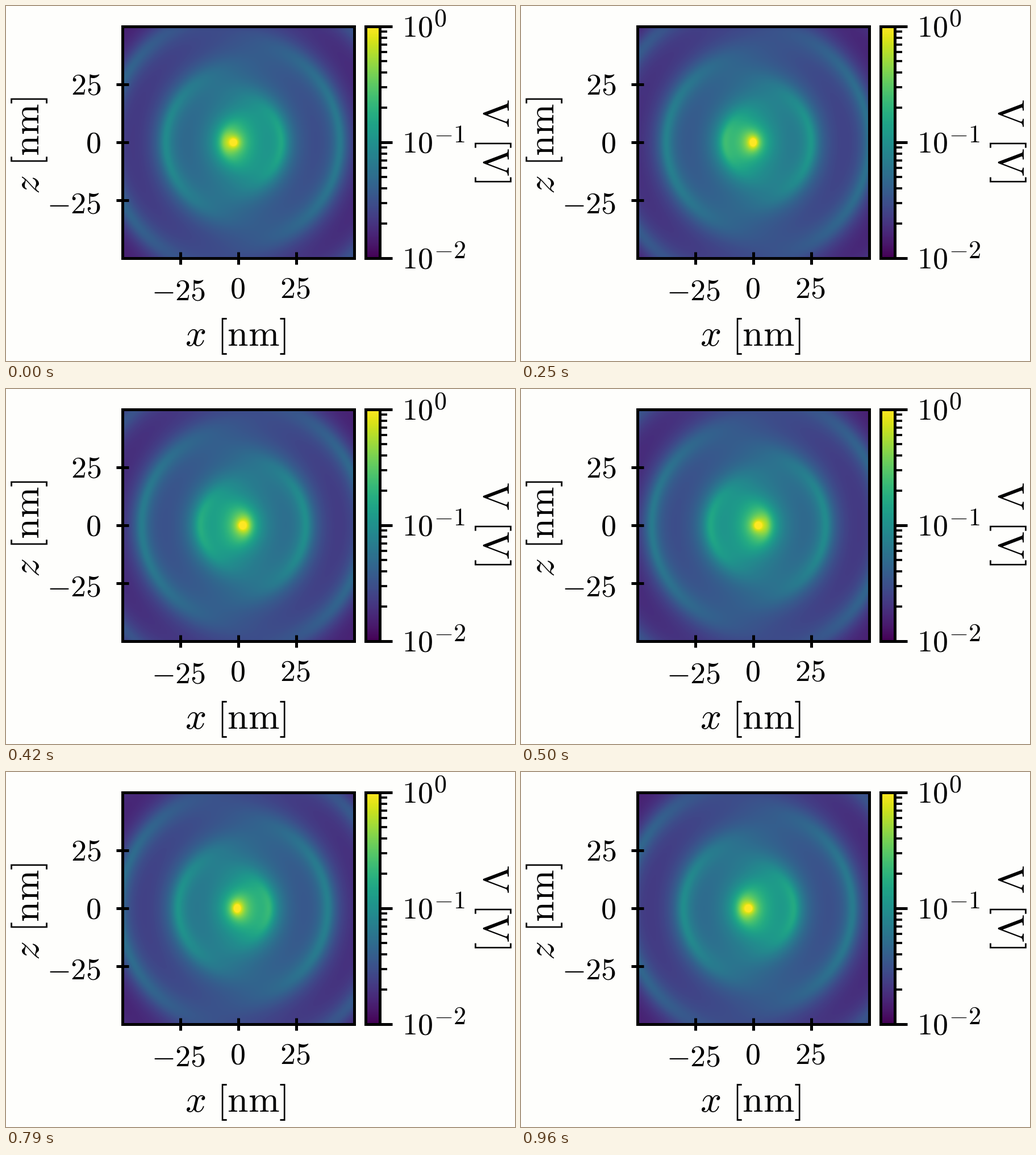
Recreate the animation shown at these times as a matplotlib script. Size 896 by 625 pixels, loop 1000 ms.

```python
import numpy as np
import matplotlib.pyplot as plt
from matplotlib.animation import FuncAnimation
from matplotlib.colors import LogNorm

W, H, DPI = 896, 625, 64
PT = 72 / DPI  # points per pixel

POSES = 24
TICKS, TICK_MS = 100, 10
AMPLITUDE = 2.0   # nm
BETA = 0.5        # peak speed / c
COULOMB = 1.44    # e / (4 pi eps0), in V nm
HALF = 50         # half width of the map, nm
SIDE = 408        # map size, px

plt.rcParams.update({
    "mathtext.fontset": "cm",
    "axes.linewidth": 5 * PT,
    "xtick.major.width": 5 * PT, "ytick.major.width": 5 * PT,
    "xtick.major.size": 22 * PT, "ytick.major.size": 22 * PT,
    "ytick.minor.width": 3.8 * PT, "ytick.minor.size": 12.5 * PT,
})

fig = plt.figure(figsize=(W / DPI, H / DPI), dpi=DPI, facecolor="#fefefc")


def pixel_axes(x, y, w, h):
    return fig.add_axes([x / W, 1 - (y + h) / H, w / W, h / H])


def label(x, y, text, size, ha="left", rotation=0):
    """Write math text with its baseline anchored at pixel (x, y)."""
    fig.text(x / W, 1 - y / H, f"${text}$", fontsize=size * PT, ha=ha,
             va="baseline", rotation=rotation, rotation_mode="anchor")


cells = ((np.arange(SIDE) + 0.5) / SIDE * 2 - 1) * HALF
X, Z = np.meshgrid(cells, cells)


def potential(pose):
    """Retarded potential of a charge oscillating along x."""
    phase = 2 * np.pi * pose / POSES
    delay = np.hypot(X, Z)
    for _ in range(7):  # Newton steps for the light-travel distance
        retarded = phase - delay * BETA / AMPLITUDE
        dx = X + AMPLITUDE * np.cos(retarded)
        dist = np.maximum(np.hypot(dx, Z), 1e-6)
        doppler = 1 - BETA * np.sin(retarded) * dx / dist
        delay = delay - (delay - dist) / doppler
    return COULOMB / (dist * doppler)


fields = [potential(pose) for pose in range(POSES)]

ax = pixel_axes(205, 36, SIDE, SIDE)
image = ax.imshow(fields[0], cmap="viridis", norm=LogNorm(1e-2, 1),
                  extent=(-HALF, HALF, -HALF, HALF), origin="lower",
                  aspect="auto", interpolation="nearest")
ax.set_xticks([-25, 0, 25])
ax.set_yticks([-25, 0, 25])
ax.tick_params(direction="inout", labelbottom=False, labelleft=False)

cax = pixel_axes(633, 36, 25, SIDE)
fig.colorbar(image, cax=cax)
cax.tick_params(which="both", labelright=False)

NUMBER, EXPONENT, TITLE = 54, 44, 65.5

for text, x, y in (("-25", 304, 518), ("0", 407, 514), ("25", 509, 514)):
    label(x, y, text, NUMBER, ha="center")
for text, y in (("25", 156), ("0", 258), ("-25", 365)):
    label(167, y, text, NUMBER, ha="right")
for power, y in (("0", 54), ("-1", 258), ("-2", 462)):
    label(697, y, "10", NUMBER)
    label(753, y - 18, power, EXPONENT)

label(315, 598, r"x\ \mathrm{[nm]}", TITLE)
label(58, 331, r"z\ \mathrm{[nm]}", TITLE, rotation=90)
label(840, 163, r"\mathrm{V}\ \mathrm{[V]}", TITLE, rotation=270)


def update(tick):
    # Each pose starts on the 10 ms tick nearest to its even share of the loop.
    image.set_data(fields[(tick * POSES + 11) // TICKS])
    return (image,)


anim = FuncAnimation(fig, update, frames=TICKS, interval=TICK_MS,
                     repeat=True, repeat_delay=0, blit=False)
plt.show()
```
